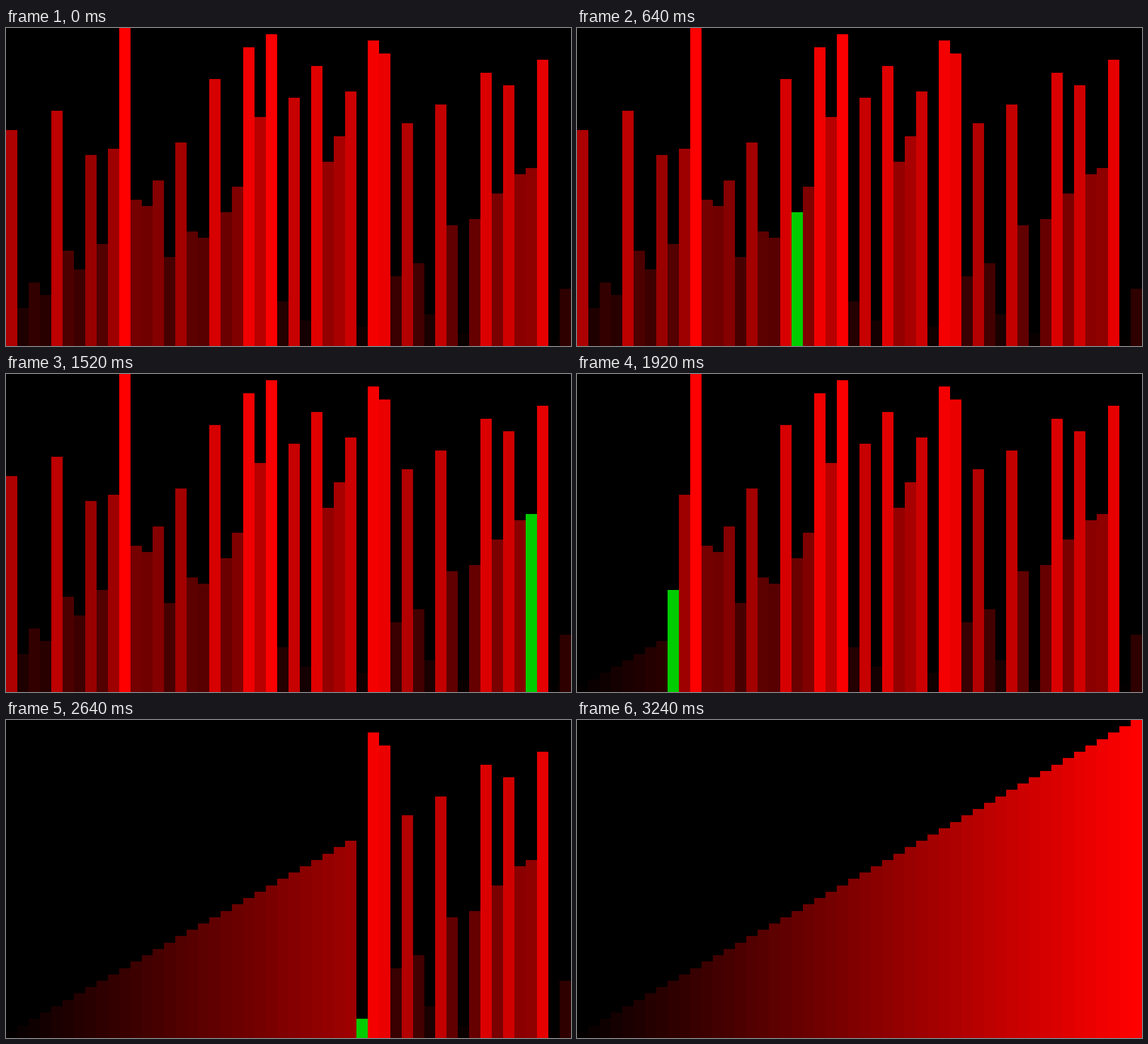
Write a matplotlib script that moves like this. It is 998 by 561 pixels and loops after 3600 ms.

```python
import matplotlib.pyplot as plt
from matplotlib.animation import FuncAnimation

# Counting sort: one pass reads every bar, a second pass writes them in order.
W, H, DPI = 998, 561, 64
FRAMES, INTERVAL = 90, 40
GREEN = (0, 0.8, 0)

VALUES = [34, 6, 10, 8, 37, 15, 12, 30, 16, 31,
          50, 23, 22, 26, 14, 32, 18, 17, 42, 21,
          25, 47, 36, 49, 7, 39, 4, 44, 29, 33,
          40, 3, 48, 46, 11, 35, 13, 5, 38, 19,
          2, 20, 43, 24, 41, 27, 28, 45, 1, 9]
N = len(VALUES)
ORDERED = sorted(VALUES)

OPS_PER_TICK = 2.078
START = -1.43
GAP = 0.02  # short pause between two operations, nothing highlighted


def bar_height(value):
    return H - round(H - value * H / N)


def state(frame):
    """Return the bar values and the highlighted index (or None)."""
    tick = (3 * frame + 2) // 5  # 15 ticks per second on a 25 fps clock
    pos = OPS_PER_TICK * tick + START
    if pos < 0:
        return VALUES, None
    if pos >= 2 * N:
        return ORDERED, None
    step = int(pos)
    written = max(0, step - N)
    cursor = step % N if pos - step > GAP else None
    return ORDERED[:written] + VALUES[written:], cursor


fig = plt.figure(figsize=(W / DPI, H / DPI), dpi=DPI, facecolor="black")
ax = fig.add_axes([0, 0, 1, 1])
ax.set_xlim(0, W)
ax.set_ylim(0, H)
ax.axis("off")

edges = [round(i * W / N) for i in range(N + 1)]
widths = [b - a for a, b in zip(edges, edges[1:])]
bars = ax.bar(edges[:-1], [0] * N, widths, align="edge",
              linewidth=0, antialiased=False)
ax.set_xlim(0, W)
ax.set_ylim(0, H)


def update(frame):
    values, cursor = state(frame)
    for i, (bar, value) in enumerate(zip(bars, values)):
        bar.set_height(bar_height(value))
        bar.set_facecolor(GREEN if i == cursor else (value / N, 0, 0))
    return list(bars)


anim = FuncAnimation(fig, update, frames=FRAMES, interval=INTERVAL,
                     repeat=True, repeat_delay=0, blit=False)
plt.show()
```
